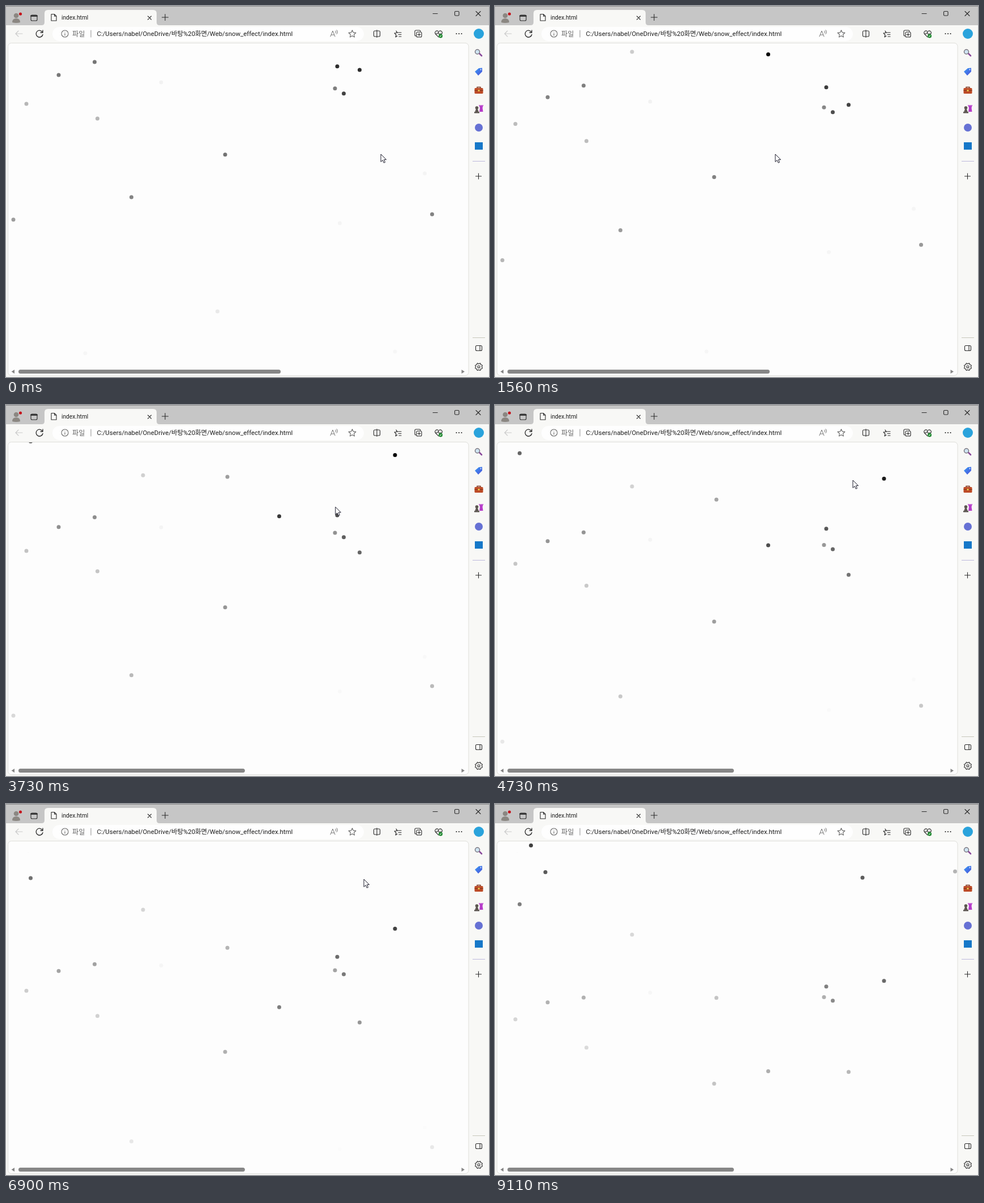
Write an HTML page that moves like this. It is 853 px wide and 656 px high and loops after 9150 ms.

```html
<!DOCTYPE html>
<html lang="ko">
<head>
<meta charset="utf-8">
<title>index.html</title>
<style>
  html, body { margin: 0; width: 100%; height: 100%; overflow: hidden; background: #f8f8f6; }
  svg { display: block; width: 853px; height: 656px; }
  text { font-family: Roboto, "Noto Sans CJK KR", "Noto Sans CJK", sans-serif; fill: #1c1c1c; }
  .line { fill: none; stroke: #2b2b2b; stroke-width: 1.1; stroke-linecap: round; stroke-linejoin: round; }
  .bar { fill: #868686; }
</style>
</head>
<body>
<svg viewBox="0 0 853 656">
  <defs>
    <clipPath id="pageClip"><rect x="4" y="66" width="813" height="587" rx="6"/></clipPath>
    <linearGradient id="tagFill" x2="1" y2="1"><stop stop-color="#3a9df5"/><stop offset="1" stop-color="#4a4fd8"/></linearGradient>
  </defs>

  <!-- window frame -->
  <rect width="853" height="656" fill="#f8f8f6"/>
  <rect width="853" height="34" fill="#c6c6c6"/>
  <rect width="853" height="1" fill="#8c8c8c"/>
  <path d="M63 34Q68 34 68 29V13Q68 7 74 7H260Q266 7 266 13V29Q266 34 271 34Z" fill="#f8f8f6"/>
  <g fill="#8b8782"><circle cx="18" cy="17" r="4.3"/><path d="M11 29Q11 22 18 22T25 29Q18 31 11 29Z"/></g>
  <circle cx="25.500" cy="14" r="2.600" fill="#c5141c"/>
  <g class="line">
    <rect x="44" y="16" width="11" height="10" rx="2"/><path d="M44.500 17.500H54.500" stroke-width="2.600"/>
    <path d="M80 14.500H85.500L89 18V26H80ZM85.500 14.500V18H89"/>
    <path d="M250.500 18L256.500 24M256.500 18L250.500 24"/>
    <path d="M275.500 20H286.500M281 14.500V25.500"/>
    <path d="M754 13.500H762"/><rect x="792.500" y="9.500" width="7.500" height="7.500" rx="1.500"/>
    <path d="M830 9.500L838 17.500M838 9.500L830 17.500"/>
  </g>
  <text x="98" y="24" font-size="10.200">index.html</text>

  <!-- toolbar -->
  <rect x="82" y="37" width="550" height="25" rx="12.500" fill="#fefefe"/>
  <g class="line">
    <path d="M29 49H17M22 44L17 49L22 54" stroke="#c9c9c9"/>
    <path d="M64.500 46.500A6 6 0 1 0 65 50.500M65 43V47H61" stroke-width="1.300"/>
    <g stroke="#6b6b6b"><circle cx="104" cy="49" r="6"/><path d="M104 48.500V52M104 46V46.100"/><path d="M150 43V55" stroke="#999"/></g>
    <path d="M573 54L577 44L581 54M574.500 51H579.500M582 44Q584 46 582 48M584 42.500Q587 46 584 49.500" stroke="#666" stroke-width=".9"/>
    <path id="star" d="" stroke="#666"/>
    <path d="M654 44H651Q649.500 44 649.500 46V52Q649.500 54 651 54H654M656 44H659Q660.500 44 660.500 46V52Q660.500 54 659 54H656M655 42.500V55.500"/>
    <path d="M689 44L690.500 47.500L686 48L689 51L688 55L691 53M689 44L691 47H698M693 50.500H698M694 54H698"/>
    <path d="M724 53Q722 53 722 51V45Q722 43 724 43H730Q732 43 732 45"/><rect x="725" y="46" width="9" height="9" rx="2"/><path d="M729.500 48V53M727 50.500H732"/>
    <path d="M764 55L758.500 49.500C756 46 760.500 41.500 764 45.500C767.500 41.500 772 46 769.500 49.500M759 49H762L763.500 46.500L765.500 51L767 49H769"/>
  </g>
  <circle cx="767.500" cy="53" r="3.500" fill="#218b32"/><path d="M766 53L767 54L769 52" fill="none" stroke="#fff"/>
  <g fill="#2b2b2b"><circle cx="795.500" cy="49" r="1.100"/><circle cx="800" cy="49" r="1.100"/><circle cx="804.500" cy="49" r="1.100"/></g>
  <text x="117" y="53.500" font-size="12.200" style="fill:#666">파일</text>
  <text x="160.500" y="53" font-size="11.400">C:/Users/nabel/OneDrive/바탕%20화면/Web/snow_effect/index.html</text>

  <!-- sidebar -->
  <circle cx="835" cy="49" r="9" fill="#2aa3dc"/>
  <path d="M836 84L840 88" stroke="#8a4a9c" stroke-width="2.600" stroke-linecap="round"/>
  <circle cx="832.500" cy="81" r="4" fill="#cfe4f2" stroke="#7b7780" stroke-width="1.500"/>
  <path d="M828 116L835 110L841 109.500V116L834 123Z" fill="url(#tagFill)"/><circle cx="838.500" cy="112.500" r="1" fill="#fff"/>
  <path d="M832 146V143.500H838V146" fill="none" stroke="#7b3319" stroke-width="1.400"/>
  <rect x="827.500" y="145" width="15" height="10" rx="1.500" fill="#bd4b27"/><path d="M827.500 149.500H842.500" stroke="#7b3319"/><rect x="833.500" y="148" width="3" height="3" fill="#eac04b"/>
  <g fill="#5d5752"><circle cx="831.500" cy="180" r="2.800"/><path d="M830 182H833L835 188H828Z"/><rect x="827" y="187" width="9" height="2.500"/></g>
  <path d="M835 175H837V176.500H838V175H840V176.500H841V175H843L841.500 180L842.500 187H836L837 180Z" fill="#b63bc9"/>
  <circle cx="835" cy="215" r="7" fill="#6671d4"/>
  <rect x="828" y="241" width="14" height="13" fill="#1678c8"/>
  <path d="M824 274.500H846" stroke="#bdb9dc"/><path d="M824 586.500H846" stroke="#c7c7bb"/>
  <g class="line">
    <path d="M829.500 301H839.500M834.500 296V306"/>
    <rect x="829.500" y="600.500" width="11" height="9" rx="2"/><path d="M837 600.500V609.500"/>
    <path id="gear" d=""/><circle cx="835" cy="638" r="2"/>
  </g>

  <!-- page -->
  <rect x="3.500" y="65.500" width="813.500" height="588" rx="6" fill="#fdfdfd" stroke="#dededa"/>
  <g id="snow" clip-path="url(#pageClip)"></g>
  <g class="bar">
    <path d="M15 643V650L9.500 646.500Z"/>
    <rect id="hThumb" x="22" y="643" height="7" rx="3.500"/>
    <path id="hArrow" d="M-2.500 643V650L3 646.500Z"/>
    <g id="vBar">
      <path d="M807 77H814.500L810.500 71.500ZM807 628.500H814.500L810.500 634Z"/>
      <rect x="807" y="84" width="7" height="531" rx="3.500"/>
    </g>
  </g>
  <path id="cursor" d="M0 0V13.500L3.200 10.600L5.300 15.300L7.500 14.300L5.500 9.700H9.600Z" fill="#fff" stroke="#1a1a2a" stroke-linejoin="round"/>
</svg>
<script>
const LOOP = 9.15, TOP = 66, FADE_END = 654, FALL_END = 656, CLIENT_BOTTOM = 636;
const $ = id => document.getElementById(id);

// x, y at t=0, px per second, opacity at the page top
const flakes = [
  [156.5, 99, 26.7, .57], [93, 122, 25.1, .58], [36, 173, 22.8, .34], [161.5, 199, 25.45, .36],
  [387, 262.7, 25.45, .82], [221.5, 338, 37.46, .89], [13, 377.7, 45.97, .81], [752.5, 368.2, 34.55, 1],
  [585, 106.7, 23.7, .88], [624.5, 113, 39.6, .9], [581, 145.7, 21.5, .58], [596.5, 154.7, 21.2, .87],
  [482.5, 5.5, 51.26, 1], [242, 50, 19.87, .2], [391, -22.5, 40.1, .42], [43.5, -14, 21, .62],
  [687, -67, 41.67, 1], [89, -249.4, 40.6, .71], [649, -314, 48.75, .71], [63.5, -200, 30, .76],
  [812.5, -154, 30, .32], [274, 135, 21.8, .05], [739.5, 296, 40, .06], [589.5, 384, 32.8, .08],
  [373.5, 540, 45.5, .4], [140, 614, 40, .4], [687, 611, 40, .4]
].map(([x, y, speed, alpha]) => {
  const dot = document.createElementNS("http://www.w3.org/2000/svg", "circle");
  dot.setAttribute("cx", x);
  dot.setAttribute("r", 3.5);
  $("snow").append(dot);
  return { dot, y, speed, alpha };
});

// start, end, from, to
const moves = [
  [.2, 1, [662, 262], [495, 262]],
  [3.2, 4.1, [495, 262], [632, 133]],
  [7.2, 7.7, [632, 133], [650, 670]]
];

function radialPath(cx, cy, points, radius) {
  const parts = Array.from({ length: points }, (_, i) => {
    const angle = i / points * 2 * Math.PI - Math.PI / 2;
    return `${cx + radius(i) * Math.cos(angle)} ${cy + radius(i) * Math.sin(angle)}`;
  });
  return `M${parts.join("L")}Z`;
}

function cursorAt(t) {
  let pos = moves[0][2];
  for (const [start, end, from, to] of moves) {
    if (t < start) break;
    const p = Math.min(1, (t - start) / (end - start));
    const eased = p * p * (3 - 2 * p);
    pos = from.map((v, i) => v + (to[i] - v) * eased);
  }
  return pos;
}

function render(t) {
  let overflow = false;
  for (const { dot, y, speed, alpha } of flakes) {
    const cy = y + speed * t;
    const opacity = alpha * (FADE_END - cy) / (FADE_END - TOP);
    dot.setAttribute("cy", cy);
    dot.setAttribute("opacity", Math.max(0, Math.min(1, opacity)));
    overflow ||= cy > CLIENT_BOTTOM && cy < FALL_END;
  }
  const inset = overflow ? 12 : 0;
  const ratio = t < 3.7 ? .5975 : .516;
  $("hThumb").setAttribute("width", (775 - inset) * ratio - (overflow ? 6 : 0));
  $("hArrow").setAttribute("transform", `translate(${807 - inset})`);
  $("vBar").setAttribute("visibility", overflow ? "visible" : "hidden");
  $("cursor").setAttribute("transform", `translate(${cursorAt(t)})`);
}

$("star").setAttribute("d", radialPath(611.5, 49.5, 10, i => i % 2 ? 3.2 : 6.8));
$("gear").setAttribute("d", radialPath(835, 638, 24, i => i % 3 ? 6.6 : 4.9));

const begin = performance.now();
function tick() {
  render((performance.now() - begin) / 1000 % LOOP);
  requestAnimationFrame(tick);
}
tick();
</script>
</body>
</html>
```
